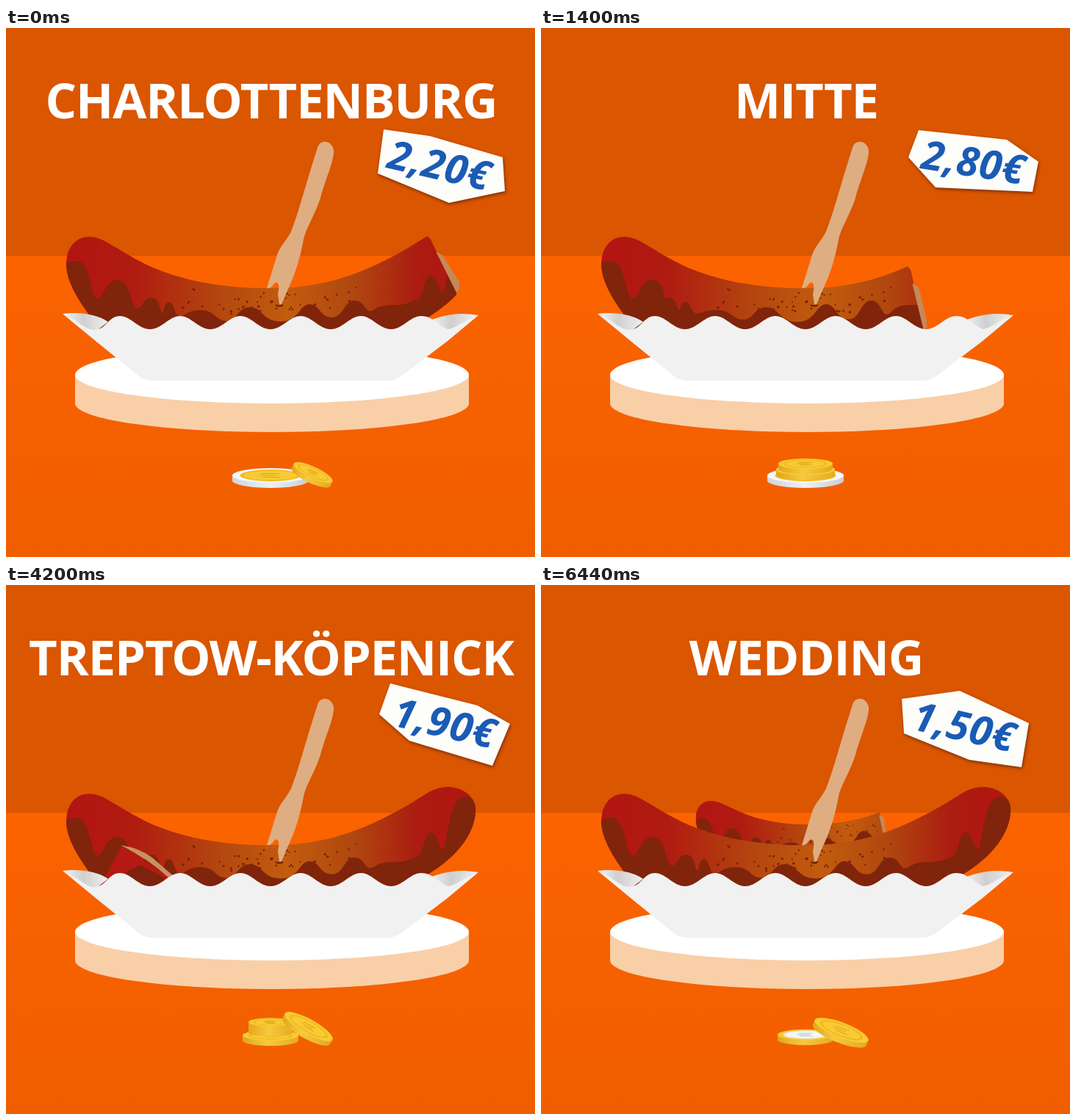
An HTML page that plays this animation: 720 by 720 pixels, repeating every 7 s.

```html
<!DOCTYPE html>
<html lang="de">
<head>
<meta charset="utf-8">
<title>Currywurst-Preise</title>
<style>
html, body { margin: 0; width: 100%; height: 100%; overflow: hidden; background: #f66100; }
svg { display: block; width: 100vw; height: 100vh; }
.title { font: 700 67px "Open Sans", "Noto Sans", sans-serif; letter-spacing: -1.2px; fill: #fff; text-anchor: middle; }
.price { font: italic 700 55px "Open Sans", "Noto Sans", sans-serif; letter-spacing: 1px; fill: #1a5bb5; }
.tag { fill: #fdfdfa; filter: drop-shadow(1px 2px 2px rgba(60, 15, 0, .6)); }
</style>
</head>
<body>
<svg id="stage" viewBox="0 0 720 720">
  <defs>
    <linearGradient id="floor" x2="0" y2="1">
      <stop stop-color="#fb6300"/><stop offset="1" stop-color="#f05e00"/>
    </linearGradient>
    <linearGradient id="meat" gradientUnits="userSpaceOnUse" x1="82" x2="640">
      <stop stop-color="#b31512"/><stop offset=".16" stop-color="#af1b11"/>
      <stop offset=".38" stop-color="#b4480e"/><stop offset=".54" stop-color="#c25c0e"/>
      <stop offset=".7" stop-color="#b0470f"/><stop offset=".86" stop-color="#ab1b11"/>
      <stop offset="1" stop-color="#b31512"/>
    </linearGradient>
    <linearGradient id="wing">
      <stop stop-color="#f4f4f4"/><stop offset=".45" stop-color="#cfcfcf"/><stop offset="1" stop-color="#f0f0f0"/>
    </linearGradient>
    <linearGradient id="gold">
      <stop stop-color="#e3a51b"/><stop offset=".45" stop-color="#f5c93f"/><stop offset="1" stop-color="#e5aa20"/>
    </linearGradient>
    <linearGradient id="silver">
      <stop stop-color="#d2d5da"/><stop offset=".5" stop-color="#eef0f2"/><stop offset="1" stop-color="#c9ccd2"/>
    </linearGradient>
  </defs>
</svg>
<script>
const HOLD = 1400;
const stage = document.getElementById('stage');

const BODY = `M130 412C108 385 82 350 82 322C82 296 97 284 113 284C135 284 150 303 200 326
  C248 346 300 354 362 354C440 354 500 330 575 282C605 265 636 280 639 302C641 330 622 375 540 412Z`;

// Sauce humps: centre, top, half width. Only the middle ones move between scenes.
const LEFT = [[97, 317, 18], [152, 343, 18]];
const MIDDLE = [[198, 367, 12], [222, 373, 7], [265, 384, 20], [332, 380, 17],
  [413, 376, 14], [474, 371, 14], [527, 377, 24]];
const RIGHT = [[578, 337, 10], [625, 288, 24]];

function sauce(shift) {
  const humps = [...LEFT, ...MIDDLE.map(([x, y, w]) => [x + shift, y, w]), ...RIGHT];
  const low = x => 400 - 30 * ((x - 345) / 215) ** 2;
  let d = 'M75 430V325';
  let from = [75, 325];
  humps.forEach(([x, y, w], i) => {
    const next = humps[i + 1];
    const vx = next ? (x + w + next[0] - next[2]) / 2 : 655;
    const valley = [vx, low(vx)];
    d += `C${x - w} ${from[1]} ${x - w} ${y} ${x} ${y}C${x + w} ${y} ${x + w} ${valley[1]} ${valley}`;
    from = valley;
  });
  return d + 'V430Z';
}

function randomFrom(seed) {
  return () => (seed = (seed * 16807) % 2147483647) / 2147483647;
}

function spices() {
  const rnd = randomFrom(4711);
  let out = '';
  for (let i = 0; i < 46; i++) {
    const x = 240 + rnd() * 245;
    const y = 359 - ((x - 362) / 40) ** 2 + rnd() * 32;
    out += `<circle cx="${x.toFixed(1)}" cy="${y.toFixed(1)}" r="${(1 + rnd() * .8).toFixed(1)}"/>`;
  }
  return `<g fill="#7b210b">${out}</g>`;
}

// A cut runs from its top point to its bottom point; the pale face starts a quarter down.
function sausage(id, shift, cut = [720, 0, 720, 440]) {
  const [x1, y1, x2, y2] = cut;
  const ax = x1 + (x2 - x1) / 4, ay = y1 + (y2 - y1) / 4;
  return `<clipPath id="${id}-cut"><path d="M0 0H${x1 - 8}V${y1 - 4}Q${x1} ${y1 - 4} ${x1 + 4} ${y1 + 6}L${x2} ${y2}V440H0Z"/></clipPath>
    <clipPath id="${id}"><path d="${BODY}"/></clipPath>
    <g clip-path="url(#${id}-cut)"><g clip-path="url(#${id})">
      <path d="${BODY}" fill="url(#meat)"/>${spices()}
      <path d="${sauce(shift)}" fill="#80240b"/>
    </g></g>
    <path d="M${ax} ${ay}l9 5L${x2 + 4} ${y2 - 14}V${y2 - 5}L${x2} ${y2}Z" fill="#c58959"/>`;
}

const backSausage = `<g transform="translate(208 296) rotate(-6) scale(.68) translate(-82 -284)">
  ${sausage('back', 0, [446, 330, 454, 400])}</g>`;

const chunk = `<path d="M157 355L131 405L150 420H215L224 398Z" fill="#b51914"/>
  <path d="M163 394Q166 386 174 387Q180 378 190 385L215 398V420H170Z" fill="#7d220c"/>
  <path d="M156 354Q182 358 199 371L229 397L221 398Q195 374 156 354Z" fill="#c9905f"/>`;

const stick = `<path d="M367 377q5 3 10 0" fill="none" stroke="#651b08" stroke-width="2"/>
  <path fill="#dfad82" d="M424 163C427 151 443 152 446 166C447 180 435 205 428 231
  C421 254 408 272 405 288C401 310 394 333 388 346L375 376H372L370 362
  C374 346 368 343 364 349Q361 355 355 354L369 309C372 298 383 288 388 277C400 246 408 212 424 163Z"/>`;

function tray() {
  const waves = 'c15 0 25 18 41 18s26 -18 41 -18'.repeat(5);
  return `<path d="M77 389C100 386 125 390 139 400L122 413C105 412 95 396 77 389Z" fill="url(#wing)"/>
    <path d="M643 391C625 388 603 387 575 399L602 412C615 409 625 398 643 391Z" fill="url(#wing)"/>
    <path d="M77 389C95 395 108 412 122 411C137 409 140 392 155 392${waves}C581 392 588 405 602 410
      C614 408 625 396 643 391L601 426L543 470Q531 480 518 480H198Q186 480 175 469L122 426Z" fill="#f1f1f1"/>`;
}

const plate = `<path d="M94 472V511A268 39 0 0 0 630 511V472Z" fill="#f9cfa8"/>
  <ellipse cx="362" cy="472" rx="268" ry="39" fill="#fff"/>`;

const FACE = { gold: '#f8cb35', silver: '#f5f6f7' };
const RING = { gold: '#f3b91c', silver: '#e6e8ec' };

function coin({ x = 360, y, rx, turn = 0, rim = 'gold', core = 'gold' }) {
  const ry = rx * (turn ? .27 : .19), h = 7;
  return `<g transform="translate(${x} ${y}) rotate(${turn})">
    <path d="M${-rx} 0V${h}A${rx} ${ry} 0 0 0 ${rx} ${h}V0Z" fill="url(#${rim})"/>
    <ellipse rx="${rx}" ry="${ry}" fill="${FACE[rim]}"/>
    <ellipse rx="${rx * .8}" ry="${ry * .8}" fill="${RING[core]}"/>
    <ellipse rx="${rx * .7}" ry="${ry * .64}" fill="${FACE[core]}"/>
    <path d="M${-rx * .25} ${-ry * .25}h${rx * .5}M${-rx * .3} 0h${rx * .45}M${-rx * .2} ${ry * .25}h${rx * .45}"
      stroke="${core === 'gold' ? '#dfa51c' : '#c3c6cd'}"/>
  </g>`;
}

const two = { y: 609, rx: 52, rim: 'silver' };
const pile = y => [two, { y: y + 8, rx: 40 }, { y, rx: 37 }];

const scenes = [
  {
    title: 'CHARLOTTENBURG', price: '2,20€', at: [517, 190, 13],
    tag: '514,138 577,147 676,176 679,222 603,238 506,198',
    shift: 0, cut: [576, 286, 613, 360],
    coins: [two, { x: 418, y: 605, rx: 29, turn: 25 }]
  },
  {
    title: 'MITTE', price: '2,80€', at: [516, 191, 9],
    tag: '514,139 634,152 677,182 669,223 537,217 500,176',
    shift: -25, cut: [500, 326, 521, 412],
    coins: pile(593)
  },
  {
    title: 'PRENZLAUER BERG', price: '2,50€', at: [505, 196, 9],
    tag: '502,144 632,156 664,173 665,233 535,232 488,203',
    shift: 20, cut: [541, 305, 587, 382],
    coins: pile(595)
  },
  {
    title: 'TREPTOW-KÖPENICK', price: '1,90€', at: [524, 191, 13],
    tag: '523,134 642,164 686,189 662,246 549,212 508,176',
    shift: 0, front: chunk,
    coins: [{ y: 613, rx: 38 }, { y: 602, rx: 30 }, { y: 595, rx: 30 }, { x: 412, y: 601, rx: 37, turn: 29 }]
  },
  {
    title: 'WEDDING', price: '1,50€', at: [503, 196, 13],
    tag: '491,155 570,144 664,188 654,248 583,238 494,202',
    shift: 0, back: backSausage,
    coins: [{ y: 612, rx: 38, core: 'silver' }, { x: 409, y: 606, rx: 39, turn: 21 }]
  }
];

function draw({ title, price, at: [x, y, turn], tag, shift, cut, back = '', front = '', coins }, i) {
  return `<g class="scene" visibility="hidden">
    <text class="title" x="361" y="122.5">${title}</text>
    <polygon class="tag" points="${tag}"/>
    <text class="price" transform="translate(${x} ${y}) rotate(${turn})">${price}</text>
    ${back}${sausage('sausage' + i, shift, cut)}${front}
    ${coins.map(coin).join('')}
  </g>`;
}

stage.insertAdjacentHTML('beforeend', `
  <rect width="720" height="310" fill="#da5600"/>
  <rect y="310" width="720" height="410" fill="url(#floor)"/>
  ${plate}${scenes.map(draw).join('')}${stick}${tray()}`);

const groups = [...stage.querySelectorAll('.scene')];
const start = performance.now();

function tick() {
  const current = Math.floor((performance.now() - start) / HOLD) % groups.length;
  groups.forEach((g, i) => g.setAttribute('visibility', i === current ? 'visible' : 'hidden'));
  requestAnimationFrame(tick);
}
tick();
</script>
</body>
</html>
```
